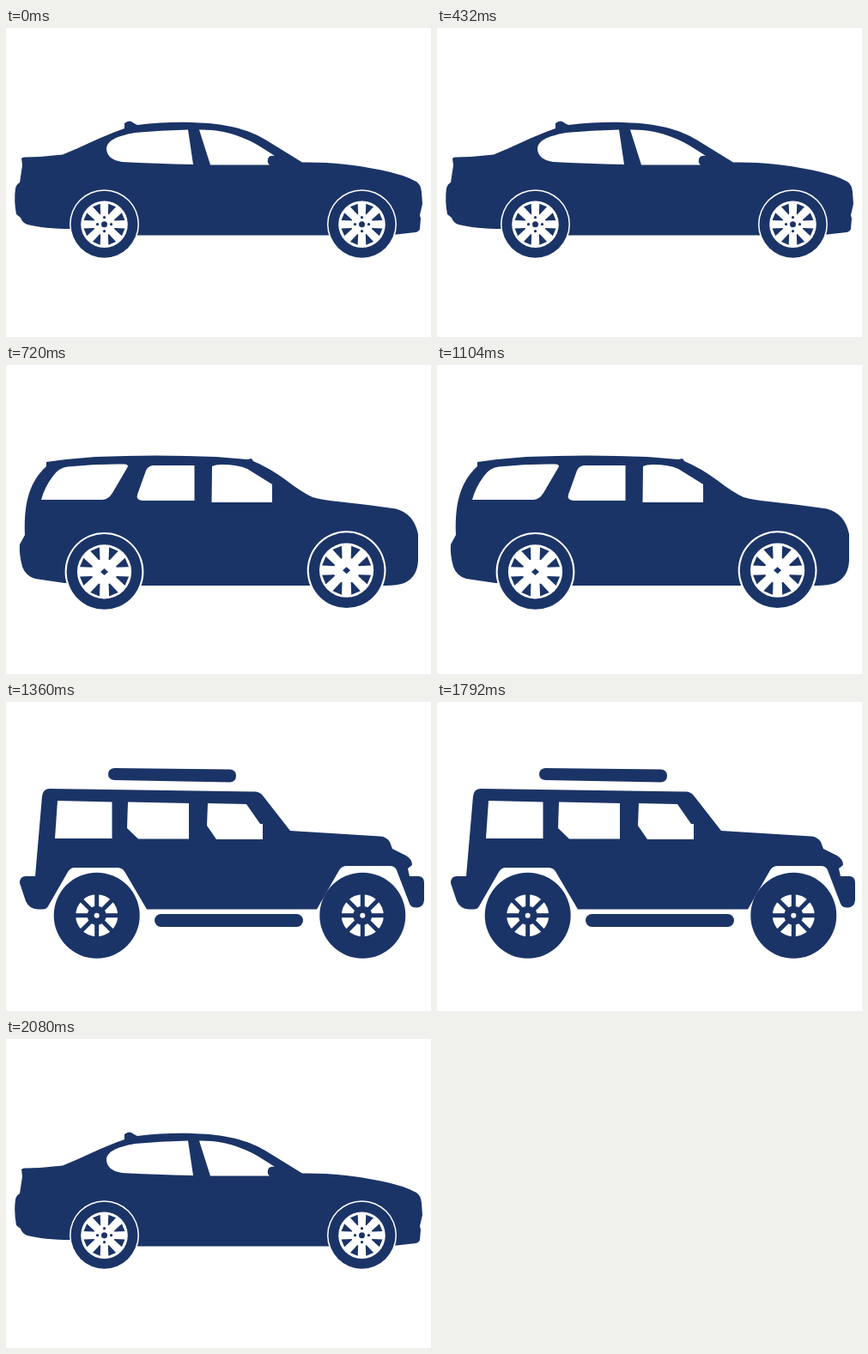
An HTML page that plays this animation: 495x360 px, repeating every 2160 ms.

```html
<!DOCTYPE html>
<html lang="en">
<head>
<meta charset="utf-8">
<title>Three cars</title>
<style>
  html, body { margin: 0; width: 100%; height: 100%; overflow: hidden; background: #fff; }
  svg { display: block; width: 495px; height: 360px; }
  .ink { fill: #1b3467; }
  .gap { fill: #fff; }
</style>
</head>
<body>
<svg id="stage" viewBox="0 0 495 360"></svg>
<script>
const LOOP = 2160;
const stage = document.getElementById('stage');

const path = (d, cls) => `<path class="${cls}" d="${d}"/>`;
const disc = (x, y, r, cls) => `<circle class="${cls}" cx="${x}" cy="${y}" r="${r}"/>`;

// Eight radial bars, width w0 at radius r0 widening to w1 at r1.
function bars(x, y, r0, r1, w0, w1, turn) {
  const d = `M${r0} ${-w0 / 2}L${r1} ${-w1 / 2}V${w1 / 2}L${r0} ${w0 / 2}Z`;
  let out = '';
  for (let a = turn; a < 360; a += 45)
    out += `<path class="ink" transform="translate(${x} ${y}) rotate(${a})" d="${d}"/>`;
  return out;
}

function sedanWheel(x, y) {
  let out = disc(x, y, 40.5, 'gap') + disc(x, y, 39, 'ink') + disc(x, y, 27.3, 'gap');
  out += bars(x, y, 12.5, 24, 1, 9.5, 22.5) + disc(x, y, 3.5, 'ink');
  for (let a = 0; a < 4; a++) {
    const t = a * Math.PI / 2;
    out += disc(x + 8 * Math.cos(t), y + 8 * Math.sin(t), 1.6, 'ink');
  }
  return out;
}

function wagonWheel(x, y) {
  return disc(x, y, 45.9, 'gap') + disc(x, y, 43.9, 'ink') + disc(x, y, 31.6, 'gap') +
    bars(x, y, 15, 28.5, 1.5, 11.5, 22.5) +
    path(`M${x - 4.5} ${y}L${x} ${y - 4}L${x + 4.5} ${y}L${x} ${y + 4}Z`, 'ink');
}

function jeepWheel(x, y) {
  return disc(x, y, 50, 'ink') + disc(x, y, 24.5, 'gap') +
    bars(x, y, 0, 25.5, 5, 5, 0) + disc(x, y, 11, 'ink') + disc(x, y, 3, 'gap');
}

const sedan =
  path('M18 152Q19 150 23 150.5Q45 150 66 147.5C90 138 112 126 138 117V111Q144 106 149 111L153 113' +
    'C178 110 205 109 226 110.5C262 112 285 120 302 130L345 156.5C376 156 405 159 437 165.5' +
    'Q464 171 478 179Q483 182 484 191L485 205L482 218L483 222L482 234Q481 237 477 238L455 240.5' +
    'L375 241.5H154L76 234C55 234 37 232 25 229Q19 227 17 221L12 217Q9 201 11 187Q12 182 16 180' +
    'L19 160Z', 'ink') +
  path('M117 140C118 130 132 125.5 150 122Q180 119 212 118.5L218 159Q174 158 135 156Q117 153 117 140Z', 'gap') +
  path('M225 118.5C262 118 287 131 313 149Q306 148 305 153Q304 157 307 159.5H238Z', 'gap') +
  sedanWheel(114.5, 228.7) + sedanWheel(414.5, 228.7);

const wagon =
  path('M47 113Q75 109 104 107Q175 104 245 107L281 110L286 109L288 112Q307 120 326 134' +
    'Q344 148 357 154Q367 157 386 159Q420 162.5 454 167.5Q475 173 480 197V228Q479 247 464 254' +
    'Q456 257 442 257H159L68 254L34 249Q23 246 19 235Q15 220 16 209L22 198' +
    'C21 168 24 139 47 118Z', 'ink') +
  path('M72 118.5Q105 115 138 115.5Q144 116 141 120L124 149Q119 157 112 157H41Q45 142 55 129Q62 119.5 72 118.5Z', 'gap') +
  path('M171 117H219.5V158H159Q151 157 153 151L163 123Q165 118 171 117Z', 'gap') +
  path('M240 118Q244 116 251 116Q270 116 281 121L310 139V160H239.5Z', 'gap') +
  wagonWheel(114.5, 240.9) + wagonWheel(396.6, 239.2);

const jeep =
  path('M126 77L261 78.5Q268 79 268 86Q268 93 261 93.5L126 91Q119 90 119 84Q119 78 126 77Z', 'ink') +
  path('M51 101L291 104.5Q296 105 299 109L331 150L436 156.5Q443 157 447 163L450 171L466 179' +
    'Q473 183 473 190L468 194L470 203H481Q487 204 487 210V231Q486 239 479 239.5Q472 240 470 235' +
    'L455 196Q453 191 447 191H397Q391 191 388 196L362 241.5H164L139 199Q136 193 130 193H80' +
    'Q75 193 72 198L49 238Q47 242 41 241.5H37Q27 241 23 232L16 211Q16 203 23 203H34' +
    'L42 110Q43 101 51 101Z', 'ink') +
  path('M60 115L123.5 116.5V159H57Z', 'gap') +
  path('M142 116.5L213 118V159.5H154L141 147Z', 'gap') +
  path('M235 118L280 119L296 142H299V160H245L234 144Z', 'gap') +
  '<rect class="ink" x="173" y="247" width="173" height="15" rx="7.5"/>' +
  jeepWheel(105.7, 248.7) + jeepWheel(415.3, 248.7);

stage.innerHTML = [sedan, wagon, jeep].map(s => `<g>${s}</g>`).join('');
const cars = [...stage.children];

function draw(t) {
  const shown = t < 720 ? 0 : t < 1360 ? 1 : t < 2080 ? 2 : 0;
  cars.forEach((car, i) => car.setAttribute('display', i === shown ? 'inline' : 'none'));
}

const start = performance.now();
function tick() {
  draw((performance.now() - start) % LOOP);
  requestAnimationFrame(tick);
}
tick();
</script>
</body>
</html>
```
